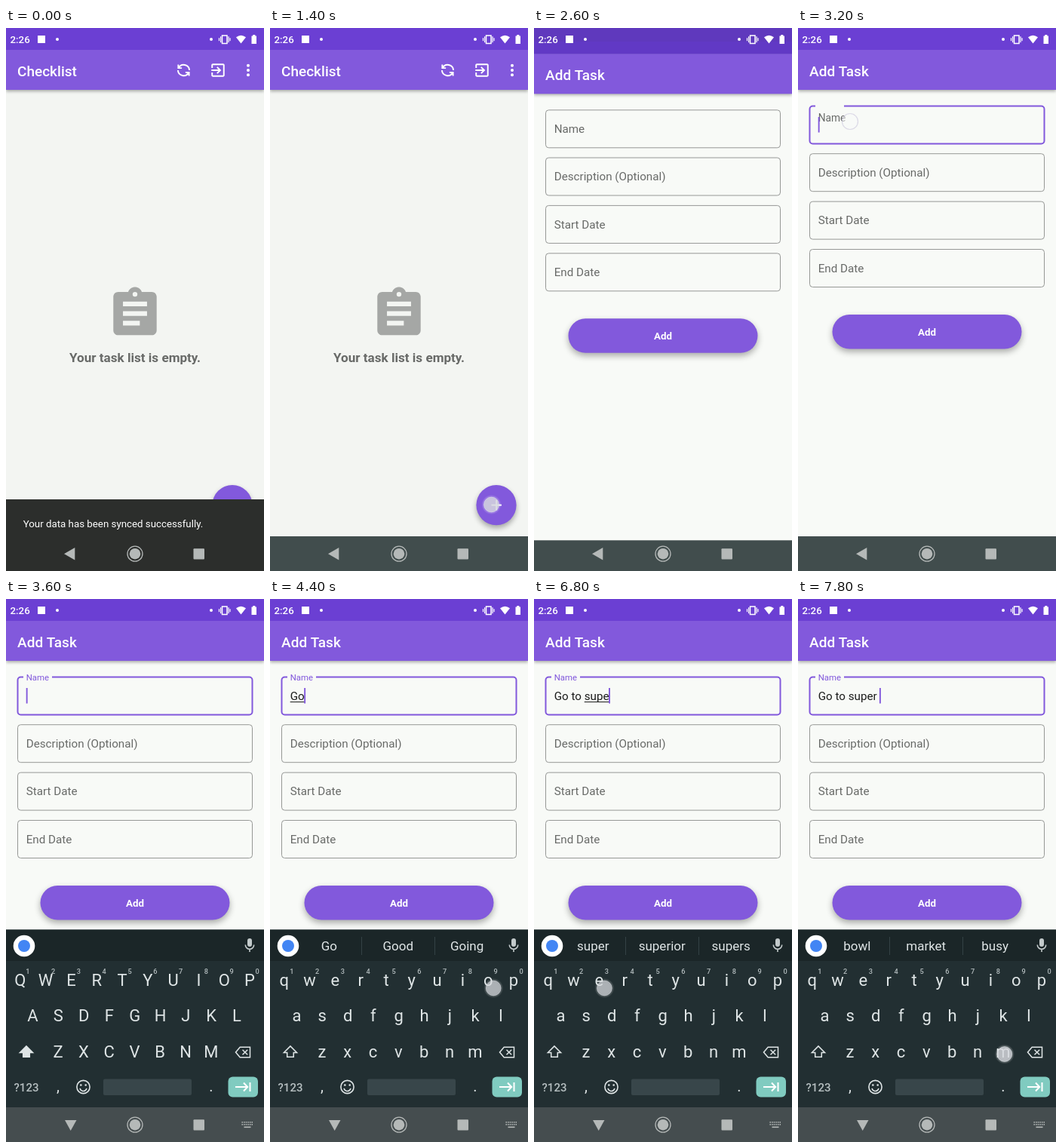
Write an HTML page with a canvas that moves like this. It is 342 by 720 pixels and loops after 8 s.

```html
<!DOCTYPE html>
<html lang="en">
<head>
<meta charset="utf-8">
<title>Checklist</title>
<style>
html, body { margin: 0; width: 100%; height: 100%; overflow: hidden; background: #f3f5f2; }
canvas { display: block; width: 342px; height: 720px; }
</style>
</head>
<body>
<canvas id="stage" width="342" height="720"></canvas>
<script>
const ctx = document.getElementById('stage').getContext('2d');
const W = 342, LOOP = 8000, STEP = 200;
const PURPLE = '#8259dc', DEEP = '#6b3fd3', KEY = '#dfe5e6';

const EXIT = new Path2D('M10.09 15.59L11.5 17l5-5-5-5-1.41 1.41L12.67 11H3v2h9.67zM19 3H5c-1.11 0-2 .9-2 2v4h2V5h14v14H5v-4H3v4c0 1.1.89 2 2 2h14c1.1 0 2-.9 2-2V5c0-1.1-.9-2-2-2z');
const CLIPBOARD = new Path2D('M19 3h-4.18C14.4 1.84 13.3 1 12 1s-2.4.84-2.82 2H5c-1.1 0-2 .9-2 2v14c0 1.1.9 2 2 2h14c1.1 0 2-.9 2-2V5c0-1.1-.9-2-2-2zM12 3a1 1 0 0 1 0 2a1 1 0 0 1 0-2zM14 17H7v-2h7zM17 13H7v-2h10zM17 9H7V7h10z');
const SYNC = new Path2D('M4.5 4v5h5M4.9 8.8A8 8 0 0 1 20 12M19.5 20v-5h-5M19.1 15.2A8 8 0 0 1 4 12');
const SHIFT = new Path2D('M12 4L3 13h4.5v6h9v-6H21z');
const ERASE = new Path2D('M8 5h14v14H8L2 12zM11.5 8.5l7 7M18.5 8.5l-7 7');
const MIC = new Path2D('M6 11a6 6 0 0 0 12 0M12 17v4');

// Time, text, suggestions
const typing = [
  [4200, 'G', 'G|Go|Get'],
  [4400, 'Go', 'Go|Good|Going'],
  [4800, 'Go ', 'to|for|back'],
  [5200, 'Go t', 'to|the|this'],
  [5400, 'Go to', 'to|too|took'],
  [5800, 'Go to ', 'super|the|go'],
  [6200, 'Go to s', 'super|see|sleep'],
  [6400, 'Go to su', 'super|sure|sun'],
  [6600, 'Go to sup', 'super|support|sup'],
  [6800, 'Go to supe', 'super|superior|supers'],
  [7000, 'Go to super', 'super|superb|supers'],
  [7400, 'Go to super ', 'bowl|market|busy']
];
const rows = [
  { keys: 'qwertyuiop', x: 18.8, y: 512.5 },
  { keys: 'asdfghjkl', x: 35.5, y: 559.5 },
  { keys: 'zxcvbnm', x: 69, y: 607.5 }
];

const clamp = v => Math.max(0, Math.min(1, v));
const easeOut = v => 1 - (1 - clamp(v)) ** 3;

function rect(x, y, w, h, color) {
  ctx.fillStyle = color;
  ctx.fillRect(x, y, w, h);
}
function rounded(x, y, w, h, r, color) {
  ctx.beginPath();
  ctx.roundRect(x, y, w, h, r);
  ctx.fillStyle = color;
  ctx.fill();
}
function disc(x, y, r, color) {
  ctx.beginPath();
  ctx.arc(x, y, r, 0, 7);
  ctx.fillStyle = color;
  ctx.fill();
}
function ring(x, y, r, color, width) {
  ctx.beginPath();
  ctx.arc(x, y, r, 0, 7);
  ctx.strokeStyle = color;
  ctx.lineWidth = width;
  ctx.stroke();
}
function poly(points, color) {
  ctx.beginPath();
  for (const [x, y] of points) ctx.lineTo(x, y);
  ctx.fillStyle = color;
  ctx.fill();
}
function text(str, x, y, size, color, weight = 400, align = 'left') {
  ctx.font = `${weight} ${size}px Roboto, sans-serif`;
  ctx.textAlign = align;
  ctx.fillStyle = color;
  ctx.fillText(str, x, y);
}
// Icons live on a 24-unit grid; a line width makes them outlined
function icon(path, x, y, scale, color, line) {
  ctx.save();
  ctx.translate(x - 12 * scale, y - 12 * scale);
  ctx.scale(scale, scale);
  ctx.fillStyle = ctx.strokeStyle = color;
  ctx.lineWidth = line;
  if (line) ctx.stroke(path);
  else ctx.fill(path, 'evenodd');
  ctx.restore();
}
function withShadow(blur, y, draw) {
  ctx.save();
  ctx.shadowColor = 'rgba(0,0,0,.32)';
  ctx.shadowBlur = blur;
  ctx.shadowOffsetY = y;
  draw();
  ctx.restore();
}

function statusIcons() {
  text('2:26', 5.5, 19.8, 13.3, '#fff', 500);
  rect(42, 10, 10, 10, '#fff');
  disc(68, 15, 2, '#fff');
  disc(272, 15, 2, '#fff');
  ctx.strokeStyle = '#fff';
  ctx.lineWidth = 1.5;
  ctx.strokeRect(286.5, 10, 6.5, 10.5);
  for (const [x, h] of [[282.5, 2], [284.6, 4], [295, 4], [297, 2]]) rect(x - .6, 15.2 - h, 1.2, h * 2, '#fff');
  ctx.beginPath();
  ctx.moveTo(311.5, 20.5);
  ctx.lineTo(305, 12.3);
  ctx.quadraticCurveTo(311.5, 7, 318, 12.3);
  ctx.fillStyle = '#fff';
  ctx.fill();
  rect(325.5, 10.5, 6.5, 10.5, '#fff');
  rect(327.3, 9, 3, 2, '#fff');
}

function appBar(title) {
  withShadow(4, 1.5, () => rect(0, 29, W, 53, PURPLE));
  rect(0, 0, W, 29, DEEP);
  text(title, 15, 63.5, 19, '#fff', 500);
}

function listScreen() {
  rect(0, 0, W, 720, '#f3f5f2');
  appBar('Checklist');
  icon(SYNC, 235.5, 56, .95, '#fff', 2);
  icon(EXIT, 281, 56, .97, '#fff');
  for (const y of [49.8, 56, 62.2]) disc(321, y, 2, '#fff');
  icon(CLIPBOARD, 171, 378.6, 3.19, '#a5a7a5');
  text('Your task list is empty.', 171, 442.5, 17.1, '#686a68', 700, 'center');
  withShadow(7, 4, () => disc(300, 632.6, 26.6, PURPLE));
  rect(293.5, 631.6, 13.4, 2, '#fff');
  rect(299.2, 626, 2, 13.4, '#fff');
}

function outline(y, color, width) {
  ctx.beginPath();
  ctx.roundRect(15.5, y, 311, 50, 4);
  ctx.strokeStyle = color;
  ctx.lineWidth = width;
  ctx.stroke();
}

function nameField(t, typed) {
  const focused = t >= 3200;
  const lift = t < 3200 ? 0 : t < 3400 ? .38 : 1;
  outline(103.5, focused ? PURPLE : '#969896', focused ? 2 : 1);
  if (focused) rect(23, 101, 38, 5, '#f8faf7');
  text('Name', 26.7, 133.6 - 25.4 * lift, 15.2 - 3.8 * lift, lift === 1 ? PURPLE : '#686a68');
  if (!focused) return;
  text(typed, 26.7, 134.2, 15.2, '#1b1c1b');
  const end = 26.7 + ctx.measureText(typed).width;
  const word = typed.split(' ').pop();
  if (word) {
    const w = ctx.measureText(word).width;
    rect(end - w, 136, w, 1, '#1b1c1b');
  }
  rect(typed ? end - .5 : 26.7, 118, 1.9, 20.5, PURPLE);
}

function formScreen(t, typed) {
  rect(0, 0, W, 720, '#f8faf7');
  appBar('Add Task');
  nameField(t, typed);
  ['Description (Optional)', 'Start Date', 'End Date'].forEach((label, i) => {
    outline(166.7 + i * 63.4, '#969896', 1);
    text(label, 26.7, 197 + i * 63.4, 15.2, '#686a68');
  });
  withShadow(8, 4, () => rounded(45.5, 380, 251, 45.5, 22.7, PURPLE));
  text('Add', 171, 407.7, 13.3, '#fff', 700, 'center');
}

function navBar(keyboard, color, dy = 0) {
  rect(0, 674 + dy, W, 46, color);
  const c = '#b5b9b8';
  if (keyboard) {
    poly([[78, 691], [93.5, 691], [85.7, 705]], c);
    for (let i = 0; i < 12; i++) rect(312.5 + i % 6 * 2.6, 693 + Math.floor(i / 6) * 3, 1.5, 1.6, c);
    rect(315.5, 699.5, 9, 1.6, c);
  } else {
    poly([[77, 697.2], [91.3, 689], [91.3, 705.4]], c);
  }
  ring(171, 697.2, 10, c, 1.3);
  disc(171, 697.2, 7.3, c);
  rounded(248.5, 690.2, 14.5, 14.2, 1, c);
}

function keyboard(rise, words, caps) {
  ctx.save();
  ctx.beginPath();
  ctx.rect(0, 0, W, 675);
  ctx.clip();
  ctx.translate(0, (1 - rise) * 236);
  rect(0, 438.5, W, 282, '#222f32');
  rect(0, 438.5, W, 41.5, '#1b2628');
  disc(24, 460, 14.3, '#fff');
  disc(24, 460, 8, '#4285f4');
  words.forEach((word, i) => text(word, 78.3 + i * 91.4, 466, 17, KEY, 400, 'center'));
  if (words.length) for (const x of [121, 218]) rect(x, 448, 1, 24, '#344245');
  rounded(320, 450, 6, 11, 3, '#c3cacb');
  icon(MIC, 323, 459.5, .95, '#c3cacb', 1.7);

  rows.forEach(({ keys, x, y }, r) => [...keys].forEach((key, i) => {
    text(caps ? key.toUpperCase() : key, x + i * 33.8, y, 22, KEY, 400, 'center');
    if (r === 0) text((i + 1) % 10, x + 10 + i * 33.8, 496.8, 9.2, '#b3bcbe', 500, 'center');
  }));
  icon(SHIFT, 27, 600.5, .95, KEY, 1.6);
  if (caps) icon(SHIFT, 27, 600.5, .95, KEY);
  icon(ERASE, 314, 601, .95, KEY, 1.6);
  text('?123', 27, 652.5, 15, '#b6bfc1', 500, 'center');
  text(',', 69, 653, 20, KEY, 400, 'center');
  text('.', 272, 653, 20, KEY, 400, 'center');
  ring(102.5, 647, 8.6, KEY, 1.6);
  disc(99.3, 644.5, 1.3, KEY);
  disc(105.7, 644.5, 1.3, KEY);
  ctx.beginPath();
  ctx.arc(102.5, 648, 4.5, .2, 2.94);
  ctx.stroke();
  rounded(129, 636.5, 117, 21.5, 2, '#38464a');
  rounded(294.5, 633.5, 39.5, 27, 6, '#80cbc0');
  rect(304, 646, 16, 2, '#fff');
  rect(322.5, 641, 2, 12, '#fff');
  ctx.beginPath();
  ctx.moveTo(315, 641.5);
  ctx.lineTo(320.2, 647);
  ctx.lineTo(315, 652.5);
  ctx.strokeStyle = '#fff';
  ctx.lineWidth = 2;
  ctx.stroke();
  ctx.restore();
}

function touch(x, y, alpha = 1) {
  ctx.save();
  ctx.globalAlpha = alpha;
  const glow = ctx.createRadialGradient(x, y, 8, x, y, 13);
  glow.addColorStop(0, 'rgba(255,255,255,.5)');
  glow.addColorStop(1, 'rgba(255,255,255,0)');
  disc(x, y, 13, glow);
  disc(x, y, 10, 'rgba(205,208,214,.68)');
  ring(x, y, 9.8, 'rgba(226,228,234,.6)', 1);
  ctx.restore();
}

function keyTouch(key, alpha) {
  if (key === ' ') return touch(221, 641, alpha);
  const r = rows.findIndex(row => row.keys.includes(key));
  const { keys, x, y } = rows[r];
  const [dx, dy] = r ? [2, -4] : [7, 3.5];
  touch(x + keys.indexOf(key) * 33.8 + dx, y + dy, alpha);
}

function snackbar(slide) {
  const y = 625 + slide * 49;
  ctx.save();
  ctx.beginPath();
  ctx.rect(0, 0, W, 674);
  ctx.clip();
  rect(0, y, W, 60, '#2c2e2c');
  text('Your data has been synced successfully.', 22.7, y + 37.3, 13.3, '#fff');
  ctx.restore();
}

function drawList(t) {
  listScreen();
  const slide = t < 600 ? 0 : easeOut((t - 540) / 250);
  if (slide < 1) snackbar(slide);
  navBar(false, slide < 1 ? '#2c2e2c' : '#414d4d');
  statusIcons();
  if (t >= 1200 && t < 1600) touch(293.5, 632, t < 1400 ? .7 : 1);
}

function drawForm(t) {
  const dy = t < 2800 ? 5.3 : 0;
  const entry = typing.filter(row => row[0] <= t).pop();
  const typed = entry ? entry[1] : '';
  ctx.save();
  ctx.translate(0, dy);
  formScreen(t, typed);
  ctx.restore();
  if (dy) {
    rect(0, 0, W, 18, '#5f39bd');
    rect(0, 18, W, 16.5, '#6139c5');
  }
  const rise = easeOut((t - 3300) / 300);
  if (rise) keyboard(rise, entry ? entry[2].split('|') : [], !entry);
  navBar(rise > 0, rise ? '#454d4f' : '#414d4d', dy);
  statusIcons();

  if (t >= 3000 && t < 3400) {
    const alpha = t < 3200 ? 1 : .55;
    disc(69, 124, 10.5, `rgba(248,249,249,${alpha})`);
    ring(69, 124, 10.5, `rgba(196,192,216,${alpha})`, 1.2);
  }
  if (t >= 4000 && t < 4200) keyTouch('g');
  if (t >= 7800) keyTouch('m');
  else if (entry && t - entry[0] < 400) keyTouch(typed.slice(-1).toLowerCase(), t === entry[0] ? .85 : .35);
}

function frame(now) {
  const t = Math.floor((now - start) % LOOP / STEP) * STEP;
  ctx.clearRect(0, 0, W, 720);
  if (t < 2600) drawList(t);
  else drawForm(t);
  requestAnimationFrame(frame);
}
const start = performance.now();
frame(start);
</script>
</body>
</html>
```
